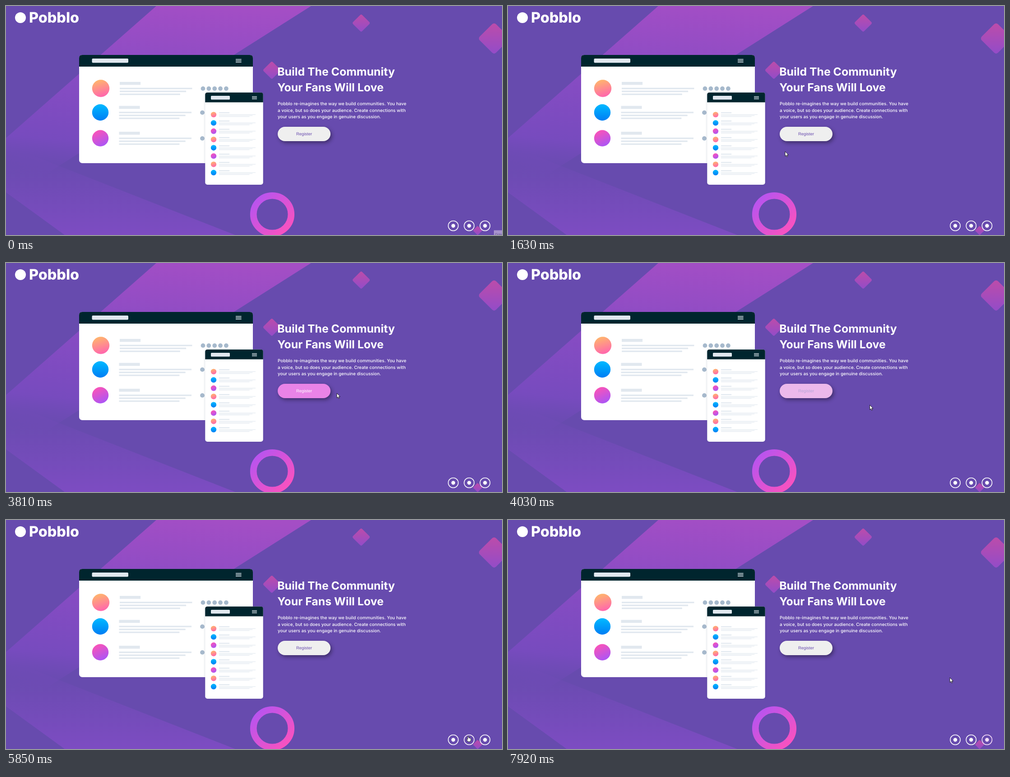
Animation of 1099 by 510 pixels, one loop 7990 ms. Source, as an HTML page:

```html
<!DOCTYPE html>
<html lang="en">
<head>
<meta charset="utf-8">
<title>Pobblo landing page</title>
<style>
  html, body { margin: 0; width: 100%; height: 100%; overflow: hidden; background: #674bae; }
  svg { display: block; width: 100%; height: 100%; }
  text { font-family: Inter, "Open Sans", sans-serif; fill: #fff; text-rendering: geometricPrecision; }
  .brand { font-size: 32.3px; font-weight: 800; }
  .title { font-size: 24.8px; font-weight: 700; }
  .copy { font-size: 9.85px; font-weight: 500; }
  .label { font: 9.45px "Liberation Sans", Arial, sans-serif; text-anchor: middle; }
  .tip { font: 7.4px "Liberation Sans", Arial, sans-serif; fill: #5d4d85; }
  .sheet { fill: #fff; }
  .head { fill: #00252e; }
  .bar { fill: #e1e8ef; }
  .dot { fill: #a6b9cc; }
  #phone .sheet { filter: drop-shadow(0 0 2px rgba(60, 80, 110, .25)); }
  #button { filter: drop-shadow(3px 4px 4px rgba(0, 0, 0, .38)); }
  #cursor path { fill: #fff; stroke: #111; stroke-width: .9; stroke-linejoin: round; }
  #hint { animation: vanish 260ms steps(4) both; }
  @keyframes vanish { to { opacity: 0; } }
</style>
</head>
<body>
<svg viewBox="0 0 1099 510" preserveAspectRatio="none">
  <defs>
    <linearGradient id="band1" gradientUnits="userSpaceOnUse" x1="540" y1="0" x2="500" y2="420">
      <stop offset="0" stop-color="#a44ec5"/>
      <stop offset=".4" stop-color="#8a4cc4"/>
      <stop offset=".8" stop-color="#794bc0" stop-opacity=".9"/>
      <stop offset="1" stop-color="#704bb8" stop-opacity="0"/>
    </linearGradient>
    <linearGradient id="band2" gradientUnits="userSpaceOnUse" x1="0" y1="325" x2="0" y2="510">
      <stop offset="0" stop-color="#7c4cc1" stop-opacity="0"/>
      <stop offset="1" stop-color="#7d4cc2"/>
    </linearGradient>
    <linearGradient id="rose" x2="1" y2="1">
      <stop offset=".1" stop-color="#b94cac"/>
      <stop offset=".9" stop-color="#964cc6"/>
    </linearGradient>
    <linearGradient id="hoop" gradientUnits="userSpaceOnUse" x1="556" y1="430" x2="624" y2="498">
      <stop offset="0" stop-color="#b954ee"/>
      <stop offset="1" stop-color="#f852c0"/>
    </linearGradient>
    <linearGradient id="warm" x1=".3" x2=".6" y2="1">
      <stop offset="0" stop-color="#ffb76b"/>
      <stop offset="1" stop-color="#ff65ae"/>
    </linearGradient>
    <linearGradient id="cool" x2="0" y2="1">
      <stop offset=".1" stop-color="#00b4ff"/>
      <stop offset="1" stop-color="#007ef4"/>
    </linearGradient>
    <linearGradient id="pink" x1=".2" x2=".7" y2="1">
      <stop offset="0" stop-color="#ff53b4"/>
      <stop offset="1" stop-color="#a955f7"/>
    </linearGradient>
    <rect id="gem" x="-25.5" y="-25.5" width="51" height="51" rx="6" transform="rotate(45)" fill="url(#rose)"/>
  </defs>

  <rect width="1099" height="510" fill="#674bae"/>
  <path d="M333 0H676L0 431V294Z" fill="url(#band1)"/>
  <path d="M0 310L508 510H130L0 415Z" fill="url(#band2)"/>
  <use href="#gem" transform="translate(1081.5 72.3)"/>
  <use href="#gem" transform="translate(787 38) scale(.56)"/>
  <use href="#gem" transform="translate(589 143) scale(.56)"/>
  <use href="#gem" transform="translate(1045 500) scale(.29)"/>
  <circle cx="590" cy="464" r="41.8" fill="none" stroke="url(#hoop)" stroke-width="14.6"/>

  <circle cx="32" cy="26" r="12" fill="#fff"/>
  <text class="brand" x="51" y="37">Pobblo</text>

  <g id="desktop"></g>
  <g id="phone"></g>

  <text class="title" x="601.2" y="154.5">Build The Community</text>
  <text class="title" x="601.2" y="189.7">Your Fans Will Love</text>
  <text class="copy" x="602" y="221">Pobblo re-imagines the way we build communities. You have</text>
  <text class="copy" x="602" y="235.8">a voice, but so does your audience. Create connections with</text>
  <text class="copy" x="602" y="250.4">your users as you engage in genuine discussion.</text>

  <rect id="button" x="602" y="269" width="117" height="32" rx="16"/>
  <text id="label" class="label" x="660.5" y="288">Register</text>
  <g id="links"></g>

  <g id="hint">
    <rect x="1081" y="499.5" width="20" height="12" fill="#a793cc"/>
    <text class="tip" x="1083.5" y="510.5">Gray</text>
  </g>

  <g id="cursor">
    <path id="arrow" d="M0 0V10.4L2.4 8.3 4 12 5.7 11.2 4.1 7.7H7.4Z"/>
    <path id="hand" d="M-1.1 1Q0 -.6 1.1 1V4.3L4.8 5Q6 5.4 6 6.6V9L5 12.7H-.4L-3.4 8.4Q-3.6 7 -2.2 7.2L-1.1 8.2Z"/>
  </g>
</svg>
<script>
const LOOP = 7990, TICK = 70, FADE_TICKS = 6;
const $ = id => document.getElementById(id);

function add(parent, tag, attrs) {
  const el = document.createElementNS("http://www.w3.org/2000/svg", tag);
  for (const k in attrs) el.setAttribute(k, attrs[k]);
  return $(parent).appendChild(el);
}
const box = (parent, kind, x, y, width, height, rx = 0) =>
  add(parent, "rect", { class: kind, x, y, width, height, rx });
const disc = (parent, cx, cy, r, attrs) => add(parent, "circle", { cx, cy, r, ...attrs });
const tint = i => ({ fill: `url(#${["warm", "cool", "pink"][i % 3]})` });

// white sheet with a dark title strip
function panel(parent, x, y, w, h, head, r) {
  box(parent, "sheet", x, y, w, h, r);
  add(parent, "path", {
    class: "head",
    d: `M${x} ${y + head}v${r - head}q0 ${-r} ${r} ${-r}h${w - 2 * r}q${r} 0 ${r} ${r}v${head - r}z`
  });
}

function menu(parent, x, y, w, gap) {
  for (let n = 0; n < 3; n++) box(parent, "bar", x, y + n * gap, w, gap * .46);
}

// a heading bar over three lines, each shorter than the last
function entry(parent, x, y, w, gap, thick) {
  box(parent, "bar", x, y, w * .287, thick * 2);
  for (let n = 0; n < 3; n++) box(parent, "bar", x, y + gap * (n + 2), w * (1 - n * .083), thick);
}

panel("desktop", 162, 109, 385, 241, 26, 7);
box("desktop", "bar", 190.5, 117, 80.5, 9.5, 2);
menu("desktop", 509, 118, 12.6, 3.2);
[183.5, 237, 294.5].forEach((y, i) => {
  const first = i === 0 ? 1 : 0, x = 250.5 + first * 1.5;
  disc("desktop", 209 + first, y, 18.2 + first, tint(i));
  entry("desktop", x, y - 14.5, 160.5, 6.5, 3.3);
  for (let n = 0; n < 5; n++) disc("desktop", x + 184.5 + n * 12.85, y + .4, 4.9, { class: "dot" });
});

panel("phone", 441.3, 192.8, 128.4, 205.2, 21.7, 5);
box("phone", "bar", 454, 200, 42, 8.5, 1.6);
menu("phone", 545, 201, 11, 2.7);
for (let i = 0; i < 8; i++) {
  const y = 241.9 + i * 18.45;
  disc("phone", 460, y, 6.2, tint(i));
  entry("phone", 472, y - 5.3, 81, 2.3, 1.1);
}

const LINK_Y = 489.5;
const linkX = [0, 1, 2].map(i => 991 + i * 35.2);
const links = linkX.map(x => [
  disc("links", x, LINK_Y, 11.1, { fill: "none", "stroke-width": 1.5 }),
  disc("links", x, LINK_Y, 4.2)
]);

// turning points of the pointer: time, x, y
const path = [
  [710, 1092, 502], [1130, 664, 449], [1480, 602, 346], [1620, 614, 324], [1690, 640, 300],
  [2110, 650, 287], [2390, 652, 281], [3490, 650, 278], [3790, 733, 290], [4280, 893, 351],
  [4700, 977, 467], [5050, 991, 491], [5400, 1009, 491], [5680, 1012, 488], [5820, 1024, 481],
  [6600, 1042, 471], [7010, 1057, 490], [7560, 1057, 490], [7920, 979, 351]
];

function pointer(t) {
  if (t < path[0][0]) return null;
  const i = path.findIndex(p => p[0] > t);
  if (i < 0) return path[path.length - 1].slice(1);
  const [t0, ...a] = path[i - 1], [t1, ...b] = path[i];
  return a.map((v, n) => v + (b[n] - v) * (t - t0) / (t1 - t0));
}

const inButton = ([x, y]) => x > 602 && x < 719 && y > 269 && y < 301;
const zones = [inButton, ...linkX.map(cx => ([x, y]) => Math.hypot(x - cx, y - LINK_Y) < 12)];
const tickTime = n => n * TICK + 10;

// hover strength, built up and released tick by tick
function glow(zone, tick) {
  let v = 0;
  for (let n = 0; n < tick; n++) {
    const p = pointer(tickTime(n));
    v = Math.min(FADE_TICKS, Math.max(0, v + (p && zone(p) ? 1 : -1)));
  }
  v /= FADE_TICKS;
  return v * v * (3 - 2 * v);
}

const mix = (a, b, k) => `rgb(${a.map((v, i) => Math.round(v + (b[i] - v) * k))})`;
const WHITE = [255, 255, 255], PINK = [233, 131, 231], GREY = [239, 239, 239], VIOLET = [104, 75, 174];
const [vanish] = $("hint").getAnimations();
vanish.pause();

function draw(t) {
  const tick = Math.floor((t - 10) / TICK);
  const p = pointer(tickTime(tick));
  const [press, ...rings] = zones.map(z => glow(z, tick));

  vanish.currentTime = t;
  $("button").style.fill = mix(GREY, PINK, press);
  $("label").style.fill = mix(VIOLET, WHITE, press);
  links.forEach(([ring, mark], i) => {
    ring.style.stroke = mark.style.fill = mix(WHITE, PINK, rings[i]);
  });

  $("cursor").style.display = p ? "" : "none";
  if (p) {
    const over = zones.some(z => z(p));
    $("cursor").setAttribute("transform", `translate(${p[0]} ${p[1]})`);
    $("hand").style.display = over ? "" : "none";
    $("arrow").style.display = over ? "none" : "";
  }
}

const start = performance.now();
function loop() {
  draw((performance.now() - start) % LOOP);
  requestAnimationFrame(loop);
}
loop();
</script>
</body>
</html>
```
